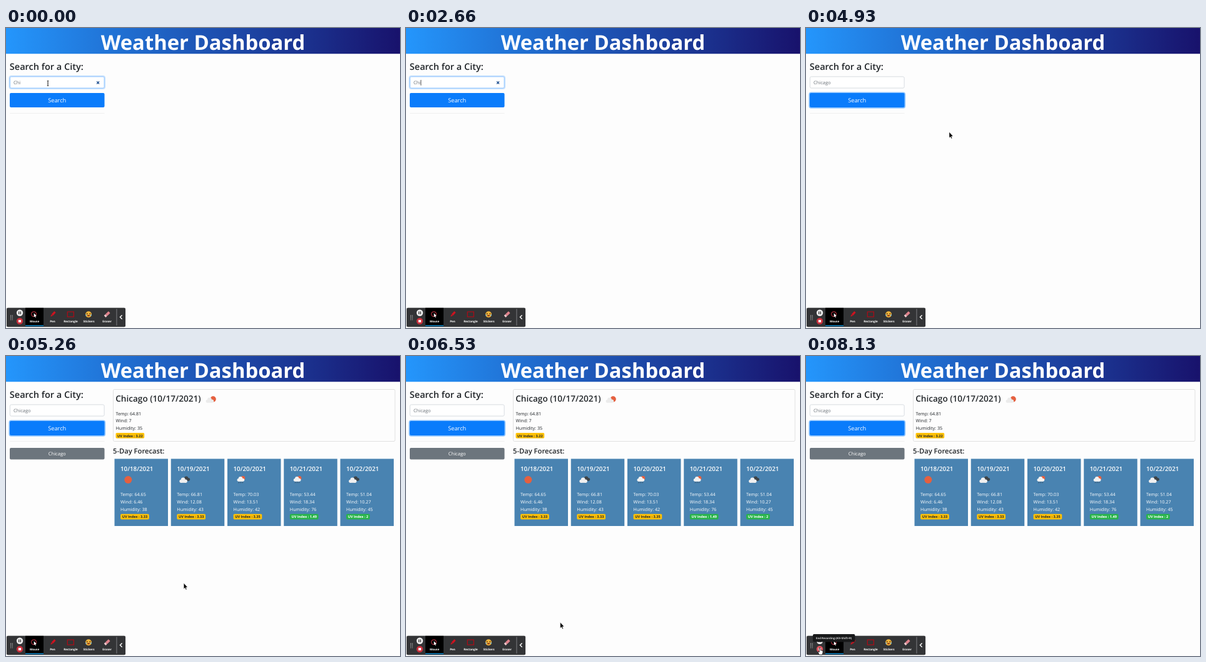
Write an HTML page with a canvas that moves like this. It is 630x480 px and loops after 8.26 s.

```html
<!DOCTYPE html>
<html lang="en">
<head>
<meta charset="utf-8">
<title>Weather Dashboard</title>
<style>
  html, body { margin: 0; width: 100%; height: 100%; overflow: hidden; background: #fdfdfd; }
  canvas { display: block; width: 630px; height: 480px; }
</style>
</head>
<body>
<canvas id="stage"></canvas>
<script>
const W = 630, H = 480, LOOP = 8260;
const canvas = document.getElementById('stage');
const ctx = canvas.getContext('2d');
const dpr = window.devicePixelRatio || 1;
canvas.width = W * dpr;
canvas.height = H * dpr;
ctx.scale(dpr, dpr);
ctx.textRendering = 'geometricPrecision';

const SANS = '"Open Sans", "Noto Sans", sans-serif';
const INK = '#212529', RED = '#d0121f', ORANGE = '#e5603f';

function text(str, x, y, size, color = INK, weight = 400, align = 'left') {
  ctx.font = `${weight} ${size}px ${SANS}`;
  ctx.fillStyle = color;
  ctx.textAlign = align;
  ctx.fillText(str, x, y);
}

function rect(x, y, w, h, fill, r = 0) {
  ctx.beginPath();
  ctx.roundRect(x, y, w, h, r);
  ctx.fillStyle = fill;
  ctx.fill();
}

function frame(x, y, w, h, color, r = 0, width = 1) {
  ctx.beginPath();
  ctx.roundRect(x, y, w, h, r);
  ctx.strokeStyle = color;
  ctx.lineWidth = width;
  ctx.stroke();
}

function disc(x, y, r, fill) {
  ctx.beginPath();
  ctx.arc(x, y, r, 0, Math.PI * 2);
  ctx.fillStyle = fill;
  ctx.fill();
}

function path(points, fill, stroke, width = 1, close = true) {
  ctx.beginPath();
  points.forEach(([x, y]) => ctx.lineTo(x, y));
  if (close) ctx.closePath();
  if (fill) { ctx.fillStyle = fill; ctx.fill(); }
  if (stroke) { ctx.strokeStyle = stroke; ctx.lineWidth = width; ctx.stroke(); }
}

function at(x, y, draw, angle = 0) {
  ctx.save();
  ctx.translate(x, y);
  ctx.rotate(angle);
  draw();
  ctx.restore();
}

// Weather icons, centred on the origin
function cloud(color, s = 1) {
  disc(-4 * s, 1.6 * s, 2.7 * s, color);
  disc(-0.6 * s, -0.8 * s, 3.6 * s, color);
  disc(3.6 * s, 1.5 * s, 2.8 * s, color);
  rect(-4 * s, 0, 7.6 * s, 4.3 * s, color);
}

const icons = {
  sun() { disc(0, 0, 6, ORANGE); },
  clouds() {
    at(3.2, -1.8, () => cloud('#3d4347', 0.85));
    at(-1.8, 0.8, () => cloud('#f0f0f0', 0.95));
  },
  rain() {
    disc(3, -2.6, 3.4, ORANGE);
    at(-0.3, -1, () => cloud('#f2f2f2', 0.9));
    for (const x of [-3, 0, 3]) path([[x, 3.4], [x - 0.9, 5.4]], null, '#3d4a55', 0.9, false);
  },
  partly() {
    disc(3.2, -0.6, 4.6, ORANGE);
    at(-2, 1.2, () => cloud('#ececec', 0.95));
  }
};

const badges = { high: ['#ffc107', INK], low: ['#28b44a', '#fff'] };

function readings(x, y, temp, wind, humidity, uv, color) {
  const [fill, ink] = badges[uv > 3 ? 'high' : 'low'];
  text('Temp: ' + temp, x, y, 7.2, color);
  text('Wind: ' + wind, x, y + 11.6, 7.2, color);
  text('Humidity: ' + humidity, x, y + 23.2, 7.2, color);
  const label = 'UV Index : ' + uv;
  ctx.font = `700 5.6px ${SANS}`;
  const w = ctx.measureText(label).width;
  rect(x, y + 28.4, w + 5.2, 8.8, fill, 1.8);
  text(label, x + 2.6, y + 34.9, 5.6, ink, 700);
}

const days = [
  ['sun', '64.65', '6.46', 38, '3.33'],
  ['clouds', '66.81', '12.08', 43, '3.33'],
  ['rain', '70.03', '13.51', 42, '3.35'],
  ['rain', '53.44', '18.34', 76, '1.49'],
  ['clouds', '51.04', '10.27', 45, '2']
];

function results() {
  rect(6, 147, 151.5, 18.4, '#6c757d', 2);
  text('Chicago', 81.7, 159, 7.6, '#fff', 400, 'center');

  frame(171.5, 53.5, 450.5, 83, '#e0e0e0', 2);
  text('Chicago (10/17/2021)', 175.2, 73.4, 13.6, INK, 600);
  at(328, 69.5, icons.partly);
  readings(175.5, 94.6, '64.81', '7', 35, '3.22', INK);

  text('5-Day Forecast:', 171, 156.3, 11.2, INK, 600);
  days.forEach(([icon, ...values], i) => {
    const x = 173.5 + i * 90.25;
    rect(x, 164.5, 85.5, 107.5, '#4983b1');
    text(`10/${18 + i}/2021`, x + 9.5, 184, 9.8, '#fff', 600);
    at(x + 21.8, 198, icons[icon]);
    readings(x + 9.6, 224.4, ...values, '#fff');
  });
}

// Search form: typed text over time
const typed = [
  [0, 'Chi'], [630, 'Ch'], [780, 'C'], [930, ''], [1400, 'c'], [1800, ''],
  [2000, 'C'], [2260, 'Ch'], [2530, 'Chi'], [3130, 'Chic'], [3330, 'Chica'],
  [3600, 'Chicag'], [3800, 'Chicago']
];
const CLICK = 4600, LOADED = 5200, TOOLTIP = 7800;

function search(t) {
  const value = typed.filter(([start]) => t >= start).pop()[1];
  const typing = t < CLICK;
  text('Search for a City:', 5.8, 66.8, 14.5, INK, 600);

  if (typing) frame(5.5, 77, 152.5, 20, '#c3dffd', 3, 2);
  rect(6, 77.5, 151.5, 19, '#fff', 2);
  frame(6.4, 77.9, 150.7, 18.2, typing ? '#80bdff' : '#d3d8dd', 2, 0.9);
  text(value, 12, 90.2, 7.5, '#6a7178');
  if (typing && t > 600) {
    rect(12.3 + ctx.measureText(value).width, 83, 0.8, 9, '#333');
  }
  if (typing && value) {
    path([[145.2, 85.6], [149, 89.4]], null, '#1d4f91', 1.4, false);
    path([[149, 85.6], [145.2, 89.4]], null, '#1d4f91', 1.4, false);
  }

  if (!typing) frame(5.4, 103.4, 152.8, 24.4, '#8ec5ff', 3, 2);
  rect(6, 104, 151.5, 23, '#0a7cfb', 2);
  text('Search', 81.7, 119.3, 9.2, '#fff', 400, 'center');
  rect(6, 136, 151.5, 0.7, '#ececec');
}

const tools = {
  Mouse() {
    ctx.beginPath();
    ctx.arc(-1, -0.5, 4, 0, Math.PI * 2);
    ctx.strokeStyle = '#d8394a';
    ctx.lineWidth = 1;
    ctx.stroke();
    at(-0.8, -2, () => path(arrow.map(([x, y]) => [x * 0.68, y * 0.68]), '#fff'));
  },
  Pen() {
    at(0.4, -0.3, () => {
      rect(-1.6, -5.2, 3.2, 6.6, RED, 0.6);
      path([[-1.6, 2], [1.6, 2], [0, 5.2]], RED);
    }, 0.75);
  },
  Rectangle() { frame(-5.2, -4.2, 10, 8, '#a90d18', 0, 1.3); },
  Stickers() {
    disc(-0.5, 0, 5, '#f3b53a');
    path([[-3.8, -1.8], [-1.8, -1], [-3.8, -0.4]], null, '#4a2b12', 0.8, false);
    path([[2.8, -1.8], [0.8, -1], [2.8, -0.4]], null, '#4a2b12', 0.8, false);
    ctx.beginPath();
    ctx.arc(-0.5, 0.9, 2.3, 0, Math.PI);
    ctx.fillStyle = '#8a3a1c';
    ctx.fill();
    disc(-4.6, 1.2, 1.1, '#58a9e0');
    disc(3.6, 1.2, 1.1, '#58a9e0');
  },
  Eraser() {
    at(0, 0, () => {
      rect(-2, -5.2, 4, 7, '#e0828c', 0.5);
      rect(-2, 1.8, 4, 3, '#f1c9cd', 0.5);
    }, 0.8);
  }
};

function toolbar(t) {
  ctx.save();
  ctx.shadowColor = 'rgba(0,0,0,.2)';
  ctx.shadowBlur = 1.5;
  rect(1, 447.8, 190, 30.4, '#333436', 2);
  ctx.restore();
  for (let i = 0; i < 8; i++) rect(7 + (i % 2) * 2.6, 459.6 + (i >> 1) * 2.2, 1.1, 1.1, '#c8c8c8');

  disc(22, 455.8, 5.2, '#ececec');
  rect(20, 453.5, 1.3, 4.6, '#333');
  rect(22.7, 453.5, 1.3, 4.6, '#333');
  disc(22, 469, 5.2, t >= 7300 ? '#e0545f' : '#c9303c');
  rect(19.9, 466.9, 4.2, 4.2, '#fff', 0.5);

  rect(31, 447.8, 29, 30, '#000');
  rect(31, 475.6, 29, 1.6, '#1593d6');
  Object.keys(tools).forEach((name, i) => {
    const x = 45.5 + i * 29;
    at(x, 458.3, tools[name]);
    text(name, x, 470.8, 4.6, '#fff', 700, 'center');
  });
  rect(176.5, 449.5, 0.9, 26.5, '#85868a');
  path([[185.6, 459.4], [182.4, 462.6], [185.6, 465.8]], null, '#fff', 1.4, false);

  if (t >= TOOLTIP) {
    rect(11, 445, 67.3, 12.4, '#18191a', 2);
    text('End Recording (Alt+Shift+R)', 44.6, 452.7, 4.35, '#fff', 600, 'center');
  }
}

// Pointers, with the hot spot at the origin
const arrow = [[0, 0], [0, 9.2], [2, 7.4], [3.4, 10.6], [4.7, 10], [3.4, 6.9], [6, 6.6]];

const pointers = {
  arrow() { path(arrow, '#000', '#fff', 0.4); },
  beam() {
    rect(-0.5, -3.6, 1, 8, '#111');
    rect(-1.3, -3.8, 2.6, 0.7, '#111');
    rect(-1.3, 4, 2.6, 0.7, '#111');
  },
  hand() {
    path([[-0.8, 0], [0.8, 0], [0.9, 3.6], [5, 4.6], [5, 7.6], [4, 11], [-0.6, 11],
      [-3, 7], [-2.4, 5.8], [-0.8, 7]], '#fff', '#111', 0.8);
  }
};

// time, x, y
const route = [
  [0, 67, 88], [4130, 67, 88], [4400, 92, 116], [4660, 92, 116], [4930, 229, 166.5],
  [5400, 299, 416], [6300, 299, 416], [7130, 22.5, 470], [7460, 22.5, 470],
  [7660, 22, 467], [LOOP, 22, 467]
];

function pointer(t) {
  if (t >= 630 && t < 4130) return;
  const i = route.findIndex(([time]) => time > t);
  const [t0, x0, y0] = route[i - 1], [t1, x1, y1] = route[i];
  const p = (t - t0) / (t1 - t0), k = p * p * (3 - 2 * p);
  const x = x0 + (x1 - x0) * k, y = y0 + (y1 - y0) * k;
  const overForm = x > 6 && x < 157;
  let kind = 'arrow';
  if (overForm && y > 77 && y < 97) kind = 'beam';
  else if (overForm && y > 104 && y < 127) kind = 'hand';
  else if (x < 191 && y > 448) kind = 'hand';
  at(x, y, pointers[kind]);
}

function draw(t) {
  rect(0, 0, W, H, '#fdfdfd');
  const sky = ctx.createLinearGradient(0, 0, W, 0);
  sky.addColorStop(0, '#2496fc');
  sky.addColorStop(1, '#18126c');
  rect(0, 0, W, 41.3, sky);
  text('Weather Dashboard', 315, 35, 32.8, '#fff', 700, 'center');
  search(t);
  if (t >= LOADED) results();
  toolbar(t);
  pointer(t);
}

function tick() {
  draw(performance.now() % LOOP);
  requestAnimationFrame(tick);
}
tick();
</script>
</body>
</html>
```
